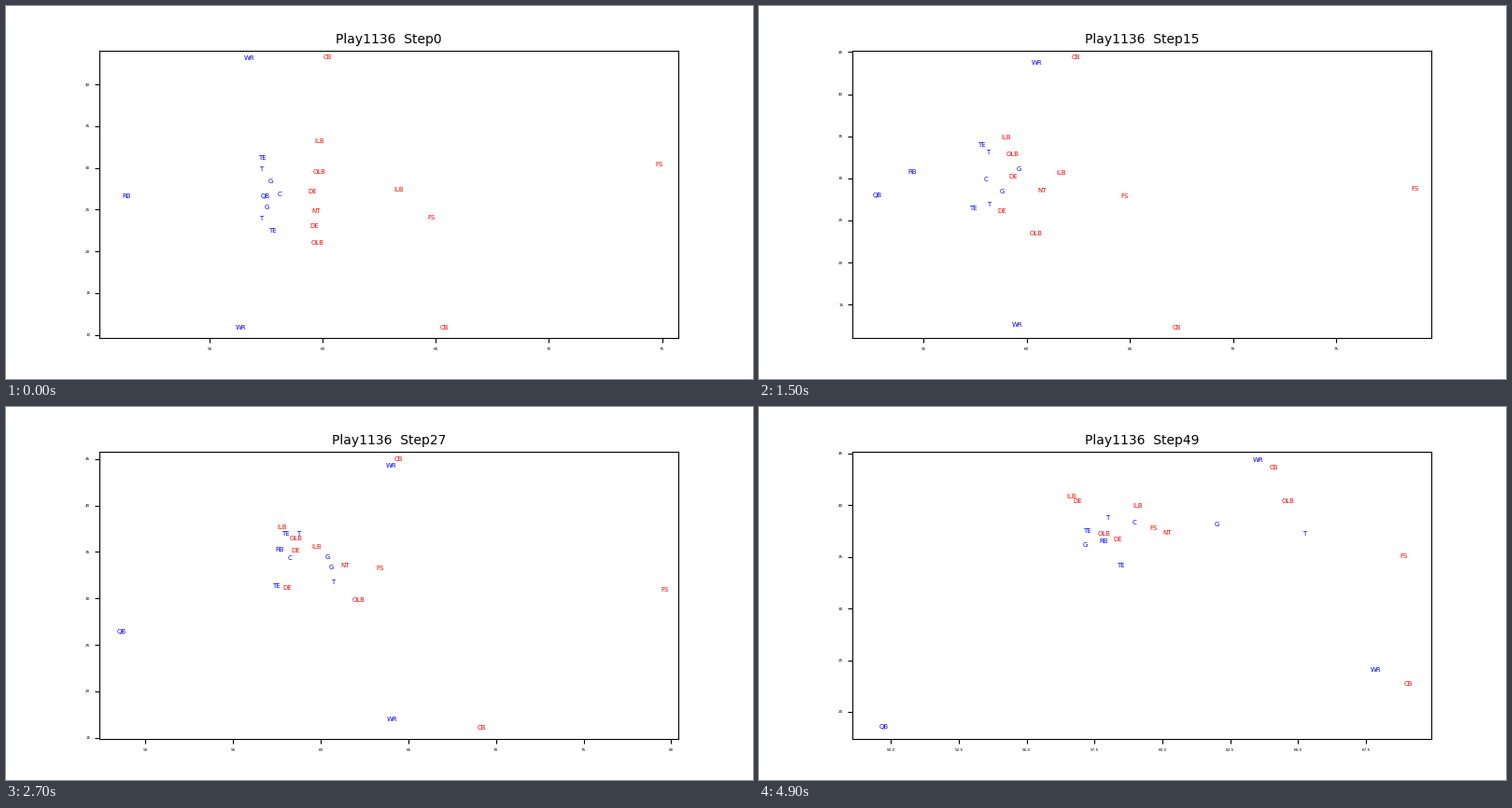
A matplotlib script that plays this animation: 800 by 400 pixels, repeating every 5000 ms.

```python
import numpy as np
import matplotlib.pyplot as plt
from matplotlib.animation import FuncAnimation

STEPS = 50
MARGIN = 1  # yards kept free around the outermost players


def glide(*waypoints):
    """Smooth run through evenly timed waypoints, at rest at both ends.

    The path is a cosine series with one harmonic per waypoint.
    """
    order = np.arange(len(waypoints))
    at_waypoints = np.cos(np.pi * np.outer(order / order[-1], order))
    at_steps = np.cos(np.pi * np.outer(np.linspace(0, 1, STEPS), order))
    return at_steps @ np.linalg.solve(at_waypoints, np.array(waypoints))


# Positions in yards: at the snap, on the way, at the end of the play
offence = [
    ("WR", glide((56.52, 42.90), (63.27, 43.97), (63.32, 44.18))),
    ("WR", glide((56.15, 10.63), (62.90, 15.67), (67.65, 23.88))),
    ("RB", glide((51.12, 26.38), (56.93, 34.38), (57.68, 36.33))),
    ("QB", glide((57.25, 26.38), (48.86, 26.97), (49.58, 18.38))),
    ("TE", glide((57.15, 30.95), (57.80, 36.28), (57.08, 37.33))),
    ("TE", glide((57.60, 22.25), (57.15, 30.20), (58.32, 33.99))),
    ("C", glide((58.00, 26.60), (58.03, 33.21), (58.89, 38.14))),
    ("T", glide((57.20, 29.61), (58.57, 36.12), (57.91, 38.59))),
    ("T", glide((57.20, 23.70), (59.92, 30.52), (65.17, 37.05))),
    ("G", glide((57.56, 28.16), (60.33, 33.68), (57.08, 35.97))),
    ("G", glide((57.43, 25.04), (60.10, 32.10), (61.93, 37.96))),
]
defence = [
    ("CB", glide((60.01, 43.02), (63.94, 44.80), (63.94, 43.46))),
    ("CB", glide((65.17, 10.63), (68.65, 14.87), (68.91, 22.52))),
    ("FS", glide((74.72, 30.17), (77.85, 28.75), (79.60, 30.00),
                 (75.40, 33.50), (68.76, 34.89))),
    ("FS", glide((64.64, 23.81), (63.58, 32.02), (59.54, 37.60))),
    ("ILB", glide((59.63, 32.96), (57.78, 36.84), (56.47, 40.66))),
    ("ILB", glide((63.14, 27.16), (59.80, 34.34), (58.91, 39.76))),
    ("OLB", glide((59.56, 29.28), (58.37, 35.69), (57.62, 37.05))),
    ("OLB", glide((59.48, 20.79), (61.37, 27.99), (64.39, 40.21))),
    ("DE", glide((59.35, 26.93), (58.55, 33.89), (56.72, 40.21))),
    ("DE", glide((59.43, 22.80), (57.93, 29.82), (58.19, 36.51))),
    ("NT", glide((59.52, 24.59), (61.12, 32.39), (60.02, 37.14))),
]

plt.rcParams["font.family"] = "DejaVu Sans"
fig, ax = plt.subplots(figsize=(8, 4), dpi=100)
ax.tick_params(labelsize=3)
title = ax.set_title("", fontsize=10)

labels, paths = [], []
for team, color in ((offence, "b"), (defence, "r")):
    for role, path in team:
        labels.append(ax.text(0, 0, role, color=color, fontsize=5))
        paths.append(path)
paths = np.array(paths)


def update(step):
    spots = paths[:, step]
    for label, spot in zip(labels, spots):
        label.set_position(spot)
    # The view follows the outermost players
    low, high = spots.min(axis=0) - MARGIN, spots.max(axis=0) + MARGIN
    ax.set_xlim(low[0], high[0])
    ax.set_ylim(low[1], high[1])
    title.set_text(f"Play1136  Step{step}")
    return [title, *labels]


anim = FuncAnimation(fig, update, frames=STEPS, interval=100, repeat=True)
plt.show()
```
